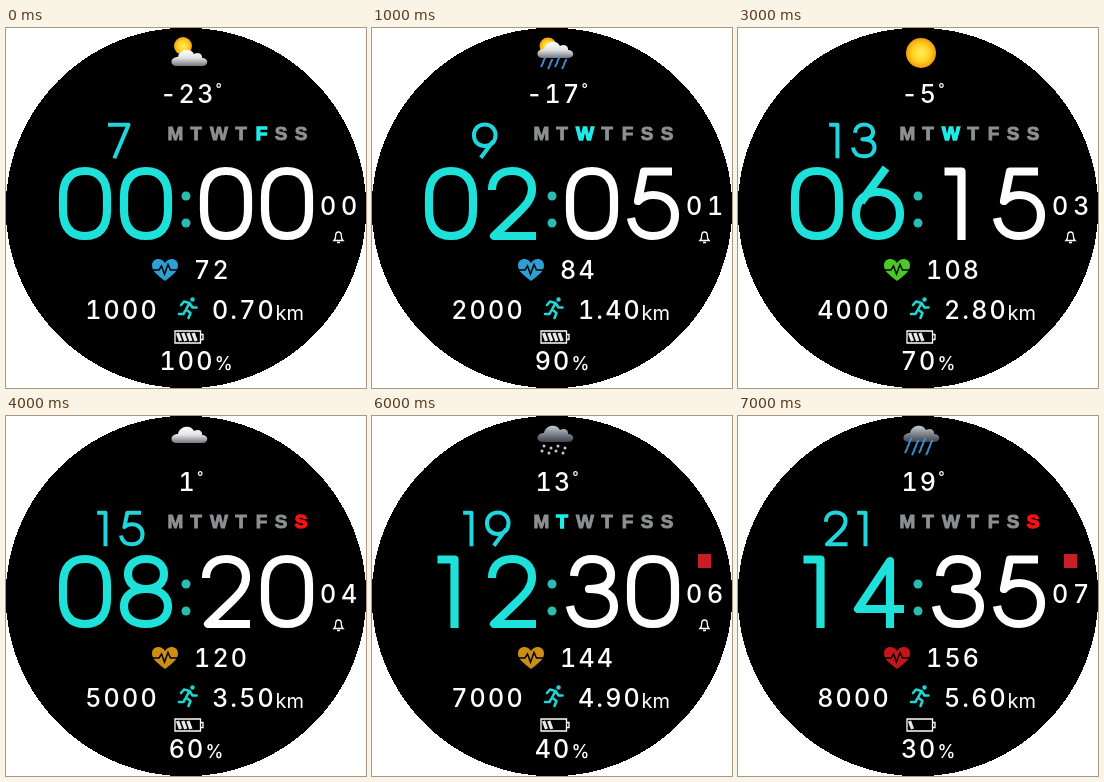
Write an HTML page that moves like this. It is 360 px wide and 360 px high and loops after 8000 ms.

```html
<!DOCTYPE html>
<html lang="en">
<head>
<meta charset="utf-8">
<title>Watch face</title>
<style>
  html, body { margin: 0; width: 100%; height: 100%; overflow: hidden; background: #fff; }
  svg { display: block; width: 100vw; height: 100vh; }
  .num { font: 500 25px Inter, sans-serif; font-variant-numeric: tabular-nums; fill: #fff; letter-spacing: 2.2px; }
  .unit { letter-spacing: 0; }
  #sec { letter-spacing: 4.8px; }
  #week { font: bold 19px "Liberation Sans", Arial, sans-serif; text-anchor: middle; }
  .mid { text-anchor: middle; }
  .end { text-anchor: end; }
  .line { fill: none; stroke-width: 8.2; stroke-linejoin: round; }
</style>
</head>
<body>
<svg viewBox="0 0 360 360" xmlns="http://www.w3.org/2000/svg">
  <defs>
    <linearGradient id="pale" x1="0" y1="0" x2="0" y2="1">
      <stop stop-color="#fff"/><stop offset=".5" stop-color="#e2e3e5"/><stop offset="1" stop-color="#74777c"/>
    </linearGradient>
    <linearGradient id="dark" x1="0" y1="0" x2="0" y2="1">
      <stop stop-color="#c6cad0"/><stop offset="1" stop-color="#3c434d"/>
    </linearGradient>
    <radialGradient id="sun">
      <stop stop-color="#ffee5c"/><stop offset=".6" stop-color="#ffd022"/><stop offset="1" stop-color="#f39a10"/>
    </radialGradient>
  </defs>
  <circle cx="180" cy="180" r="180.3" shape-rendering="crispEdges"/>
  <g id="sky"></g>

  <text class="num mid" x="185" y="75"><tspan id="temp"></tspan><tspan class="unit" font-size="14" dy="-9">°</tspan></text>
  <g id="date" class="line" stroke="#20d6dc" role="img"></g>
  <g id="week"></g>

  <g id="hour" class="line" stroke="#1ee2da" role="img"></g>
  <g id="minute" class="line" stroke="#fff" role="img"></g>
  <g fill="#28bcb2"><circle cx="180" cy="168" r="4.5"/><circle cx="180" cy="195" r="4.5"/></g>
  <text id="sec" class="num" x="314" y="187"></text>

  <rect id="link" x="326" y="138" width="13" height="14" fill="#c81e28"/>
  <path id="bell" d="M328 212.5Q329.7 211 329.7 207.5Q329.7 204 332.5 204Q335.3 204 335.3 207.5Q335.3 211 337 212.5ZM331 214.5H334" fill="none" stroke="#fff" stroke-width="1.3"/>

  <path id="heart" d="M159 253C153 248 146 244 146 237.5C146 230 155.5 229 159 235C162.5 229 172 230 172 237.5C172 244 165 248 159 253Z"/>
  <path d="M146 242H153L155.5 238L158.5 246L162 236.5L164.5 242H172" fill="none" stroke="#000" stroke-width="1.5"/>
  <text id="pulse" class="num" x="188" y="251"></text>

  <text id="steps" class="num mid" x="116" y="291"></text>
  <g fill="none" stroke="#20d6d2" stroke-width="2.6" stroke-linecap="round" stroke-linejoin="round">
    <circle cx="186.5" cy="271.5" r="1.5" fill="#20d6d2" stroke-width="1.5"/>
    <path d="M175 277L178 273.5L183.5 275L180 281.5L184.5 285L182.5 290M179 283L177.5 286H173M183.5 275L186.5 279.5H190.5"/>
  </g>
  <text id="dist" class="num end" x="270" y="291"></text>
  <text class="num unit" x="269.5" y="292" style="font-size:20px;font-weight:400">km</text>

  <path d="M169 303H194.5V315H169ZM195 306.5H197V311.5H195" fill="none" stroke="#fff" stroke-width="1.3"/>
  <g id="cells" stroke="#e8e8e8" stroke-width="3.4"></g>
  <text class="num mid" x="190" y="342"><tspan id="power"></tspan><tspan class="unit" font-size="18">%</tspan></text>
</svg>
<script>
const $ = id => document.getElementById(id);
const put = (id, s) => { $(id).textContent = s; };
const show = (id, on) => { $(id).style.display = on ? "" : "none"; };
const two = n => String(n).padStart(2, "0");

// Digit centre lines in a 52 x 73 cell.
const glyphs = [
  "M4 30C4 12 12 4 26 4S48 12 48 30V43C48 61 40 69 26 69S4 61 4 43Z",
  "M12.5 4.5H29.5V73",
  "M6 23C6 11 14 4 26 4S46 11 46 22C46 32 40 38 32 46L8 69H50",
  "M8 21C9 10 16 4 26 4C38 4 45 11 45 20C45 29 38 34 23 34C40 34 48 41 48 51C48 62 39 69 26 69C13 69 6 62 4 51",
  "M38 73V6L6 54H52",
  "M45 4.5H17L11 34C16 29 21 28 26 28C39 28 48 36 48 48C48 61 39 69 26 69C14 69 6 62 4 51",
  "M34 1L9 35M26 25C39 25 48 34 48 47S39 69 26 69S4 60 4 47S13 25 26 25Z",
  "M4 4.5H46L17 73",
  "M26 4C38 4 44 11 44 19S38 34 26 34S8 27 8 19S14 4 26 4ZM26 34C40 34 48 41 48 51.5S40 69 26 69S4 62 4 51.5S12 34 26 34Z",
  "M18 72L43 38M26 4C39 4 48 13 48 26S39 48 26 48S4 39 4 26S13 4 26 4Z"
];

function digits(id, text, x, y, pitch, scale = 1) {
  $(id).setAttribute("aria-label", text);
  $(id).innerHTML = [...text].map((d, i) =>
    `<path transform="translate(${x + i * pitch} ${y}) scale(${scale})" d="${glyphs[d]}"/>`).join("");
}

const sun = (x, y, r) => `<circle cx="${x}" cy="${y}" r="${r}" fill="url(#sun)"/>`;
const cloud = (y, tone = "pale") => `<path transform="translate(183 ${y})" fill="url(#${tone})"
  d="M-12 8C-20 8 -19 -1 -11 -1C-10 -9 2 -11 5 -4C10 -7 14 -3 13 0C20 0 20 8 13 8Z"/>`;

function fall(n, y, draw) {
  let s = "";
  for (let i = 0; i < n; i++) s += draw(172 + (i % 4) * 7 - (i >> 2) * 2, y + (i >> 2) * 5 + (i % 2) * 2);
  return s;
}
const rain = (n, y) => fall(n, y, (x, v) =>
  `<path d="M${x + 1.5} ${v}l-2.5 5" stroke="#3f8fd8" stroke-width="1.8"/>`);
const snow = (n, y) => fall(n, y, (x, v) => `<circle cx="${x}" cy="${v + 1}" r="1.5" fill="#c4c8cc"/>`);

const skies = [
  sun(177, 18, 9) + cloud(30),
  sun(176, 18, 8.5) + cloud(22) + rain(8, 29),
  sun(177, 18, 8.5) + cloud(22) + snow(8, 32),
  sun(183, 25, 15),
  cloud(19),
  cloud(18, "dark") + rain(4, 28),
  cloud(18, "dark") + snow(8, 29),
  cloud(18, "dark") + rain(12, 22)
];

function week(day) {
  const spots = [169.5, 190, 213, 235, 255.5, 275, 295];
  $("week").innerHTML = spots.map((x, i) => {
    const tone = i !== day ? "#8c9090" : i === 6 ? "#ff1010" : "#20ece8";
    return `<text x="${x}" y="111.5" fill="${tone}" stroke="${tone}" stroke-width="${i === day ? 1.4 : 0.9}">${"MTWTFSS"[i]}</text>`;
  }).join("");
}

function heartTone(pulse) {
  if (pulse < 90) return "#2d9fd2";
  if (pulse < 115) return "#4ac824";
  return pulse < 150 ? "#cc8e16" : "#c81418";
}

function render(k) {
  const date = 7 + 2 * k, pulse = 72 + 12 * k, power = 100 - 10 * k;
  const day = (new Date(2022, k, date).getDay() + 6) % 7;
  $("sky").innerHTML = skies[k];
  put("temp", -23 + 6 * k);
  digits("date", String(date), date < 10 ? 100 : 85, 94.5, 28, 0.49);
  week(day);
  digits("hour", two(2 * k), 53, 139, 61);
  digits("minute", two(5 * k), 194, 139, 61);
  put("sec", two(k));
  show("link", k >= 5);
  show("bell", k < 7);
  $("heart").style.fill = heartTone(pulse);
  put("pulse", pulse);
  put("steps", 1000 * (k + 1));
  put("dist", (0.7 * (k + 1)).toFixed(2));
  put("power", power);
  let cells = "";
  for (let i = 0; i < Math.min(4, Math.floor(power / 20)); i++) cells += `<path d="M${171.5 + i * 5.2} 305l3 8"/>`;
  $("cells").innerHTML = cells;
}

let shown = -1;
const start = performance.now();
function tick() {
  const k = Math.floor((performance.now() - start) / 1000) % 8;
  if (k !== shown) render(shown = k);
  requestAnimationFrame(tick);
}
tick();
</script>
</body>
</html>
```
